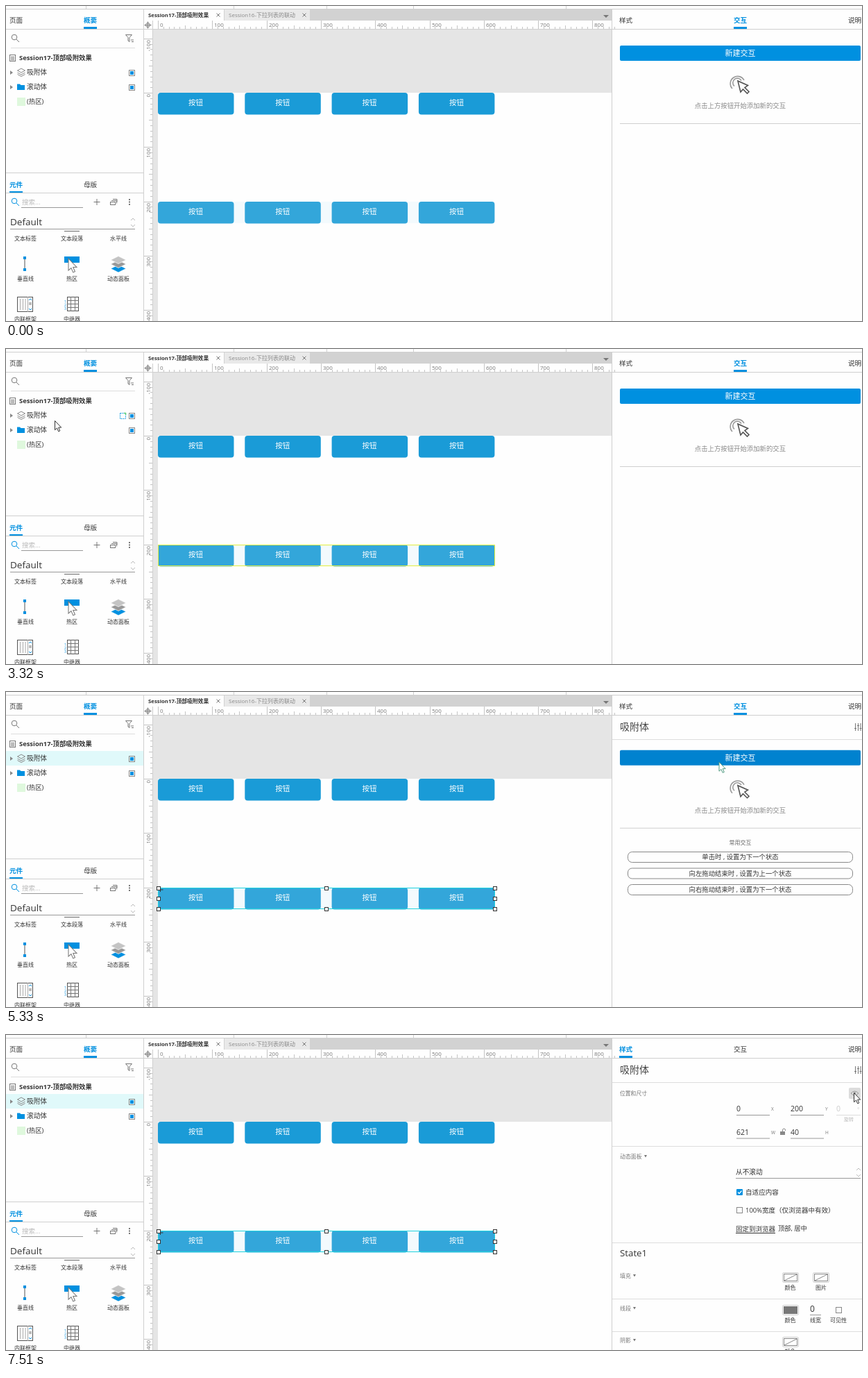
Write an HTML page that moves like this. It is 1234 px wide and 454 px high and loops after 8000 ms.

```html
<!DOCTYPE html>
<html>
<head>
<meta charset="utf-8">
<style>
  html, body { margin: 0; width: 100%; height: 100%; overflow: hidden; background: #fefefe; }
  svg { display: block; width: 1234px; height: 454px; }
  text { font-family: "Open Sans", "Noto Sans CJK SC", "Noto Sans CJK", sans-serif; white-space: pre; }
</style>
</head>
<body>
<svg id="stage" viewBox="0 0 1234 454"></svg>
<script>
const BLUE = '#0090e0', LINE = '#cfcfcf', INK = '#333', GREY = '#777';

// Markup helpers
const rect = (x, y, w, h, fill, more = '') =>
  `<rect x="${x}" y="${y}" width="${w}" height="${h}" fill="${fill}" ${more}/>`;
const box = (x, y, w, h, stroke, fill = 'none', r = 0) =>
  rect(x + .5, y + .5, w - 1, h - 1, fill, `stroke="${stroke}" rx="${r}"`);
const path = (d, stroke, fill = 'none', width = 1) =>
  `<path d="${d}" stroke="${stroke}" fill="${fill}" stroke-width="${width}"/>`;
const text = (x, y, s, size, fill = INK, more = '') =>
  `<text x="${x}" y="${y}" font-size="${size}" fill="${fill}" ${more}>${s}</text>`;
const center = (x, y, s, size, fill, more = '') =>
  text(x, y, s, size, fill, 'text-anchor="middle" ' + more);
const hline = (x1, x2, y, color = LINE) => rect(x1, y, x2 - x1, 1, color);
const group = (id, body, more = '') => `<g id="${id}" ${more}>${body}</g>`;
const bold = 'font-weight="700"';

const tab = (x, y, s, active) => active
  ? text(x, y, s, 9.6, BLUE, bold) + rect(x, y + 6, 19, 3, BLUE)
  : text(x, y, s, 9.6);
const search = (y, color) =>
  `<circle cx="12" cy="${y - 1}" r="3.8" fill="none" stroke="${color}"/>` +
  path(`M15 ${y + 2}l4 4`, color);
const spinner = (x, y) => path(`M${x - 3} ${y - 3}l3 -3l3 3M${x - 3} ${y + 3}l3 3l3 -3`, '#bbb');
const cross = x => path(`M${x - 2.5} 10.5l5 5m0 -5l-5 5`, GREY);
const arrow = 'V13.2L3 10.4L5.2 15.3L7.3 14.4L5.2 9.6H9.2Z';

function leftPanel() {
  const expander = y => path(`M6 ${y - 3}l4 3l-4 3z`, 'none', '#888');
  const visibility = y => box(177, y - 4, 9, 9, '#888') + rect(179, y - 2, 5, 5, BLUE);
  const layer = (y, fill) => path(`M162 ${y - 5.5}l11 5.5l-11 5.5l-11 -5.5z`, '#fefefe', fill, .7);
  const labels = (y, names) => names.map((s, i) => center(28 + i * 67, y, s, 8)).join('');
  const icons =
    // vertical line, hot spot, dynamic panel
    path('M27 363v18', '#555') + rect(25, 361, 4, 4, BLUE) + rect(25, 378, 4, 4, BLUE) +
    rect(84, 361, 22, 9, BLUE) +
    `<g transform="translate(90 364) scale(1.3)">${path('M0 0' + arrow, '#777', '#fff', .8)}</g>` +
    layer(378.5, BLUE) + layer(372, '#999') + layer(366, '#c4c4c4') +
    // inline frame, repeater
    box(16, 419, 23, 22, '#555') + path('M31.5 419v22M20.5 422v16M24.5 422v16M28 422v16', '#aaa') +
    path('M33 424l2 -2l2 2M33 436l2 2l2 -2', BLUE) + rect(33, 427, 4, 4, '#bbb') +
    box(88, 419, 17, 21, '#555') + path('M93.5 419v21M99.5 419v21M88 424.5h17M88 429.5h17M88 434.5h17', GREY) +
    [1, 2, 3].map(i => text(84, 423 + i * 5, i, 5, BLUE)).join('');
  return group('row', rect(0, 85, 198, 21, '#e0f9fa')) +
    tab(5, 24, '页面') + tab(112, 24, '概要', true) + hline(0, 198, 33) +
    search(46, GREY) + path('M172.5 41.5h9l-3.5 4v6l-2 -1.5v-4.500zM180 49h4M181 51.500h3', GREY) +
    hline(7, 186, 60, '#ddd') +
    box(5, 70, 9, 10, GREY) + path('M7 73.5h5M7 75.5h5M7 77.500h5', GREY) +
    text(19, 77.500, 'Session17-顶部吸附效果', 9.4, INK, bold) +
    expander(96) + expander(117) + visibility(96) + visibility(117) +
    path('M16.5 93l5.500 -3l5.500 3l-5.500 3zM16.5 96l5.500 3l5.500 -3M16.5 98.500l5.500 3l5.500 -3', '#888') +
    path('M16 112.500h4l1.500 1.500h5.500v7h-11z', 'none', BLUE) +
    rect(16, 132, 12, 12, '#dff8dd') +
    text(30, 98.500, '吸附体', 9.700) + text(30, 120, '滚动体', 9.700) + text(30, 141, '(热区)', 9.400) +
    group('target', rect(164.500, 92.500, 8, 8, 'none', 'stroke="#1a9fe0" stroke-dasharray="2 1"') +
      path('M170 92.500h3M172.500 92v3', '#5c7', 'none', 1.500)) +
    hline(0, 198, 240) + tab(5, 261, '元件', true) + tab(112, 261, '母版') + hline(0, 198, 269) +
    search(282, BLUE) + text(23, 286, '搜索...', 9.500, '#bbb') + hline(22, 111, 290, '#999') +
    path('M126.500 282.500h9M131 278v9', GREY) +
    box(150, 282, 8, 5, GREY) + path('M152 280.500h7.500v4M154 278.500h6v4', GREY) +
    [278, 281.500, 285].map(y => rect(177, y, 2, 2, GREY)).join('') +
    text(6, 315.500, 'Default', 13.500) + spinner(183, 312) + hline(6, 186, 321, '#999') +
    hline(84, 106, 324, '#666') + icons +
    labels(338, ['文本标签', '文本段落', '水平线']) +
    labels(396, ['垂直线', '热区', '动态面板']) +
    labels(454, ['内联框架', '中继器']) + rect(198, 4, 1, 450, LINE);
}

function rulers() {
  const unit = .783, ticks = [];
  for (let i = -10; i <= 84; i++) {
    const x = Math.round(219 + i * 10 * unit), y = Math.round(125 + i * 10 * unit);
    const major = i % 10 === 0, len = major ? 12 : i % 5 ? 3 : 5;
    if (x >= 212) ticks.push(rect(x, 33 - len, 1, len, '#c4c4c4'));
    if (y > 34) ticks.push(rect(211 - len, y, len, 1, '#c4c4c4'));
    if (!major) continue;
    if (i >= 0) ticks.push(text(x + 3, 30, i * 10, 8, GREY));
    if (y > 34 && y < 454)
      ticks.push(text(0, 0, i * 10, 8, GREY, `text-anchor="end" transform="translate(208 ${y + 2}) rotate(-90)"`));
  }
  return rect(199, 21, 674, 13, '#fefefe') + rect(199, 34, 12, 420, '#fefefe') + ticks.join('') +
    hline(199, 873, 33) + rect(211, 21, 1, 433, LINE) +
    '<circle cx="204.5" cy="27.5" r="3" fill="none" stroke="#777"/>' + path('M199.500 27.500h10M204.500 22.500v10', GREY);
}

function editor() {
  const buttons = (y, fill) => [0, 1, 2, 3].map(i =>
    rect(219 + i * 125.3, y, 109.500, 31.500, fill, 'rx="4"') +
    center(273.500 + i * 125.3, y + 18.300, '按钮', 10.500, '#fff')).join('');
  const handles = [[219, 282], [461, 282], [704, 282], [219, 297], [704, 297], [219, 312], [461, 312], [704, 312]]
    .map(([x, y]) => box(x - 2, y - 2, 6, 6, '#333', '#fff')).join('');
  return rect(199, 5, 674, 16, '#d2d2d2') + rect(199, 5, 115, 16, '#fefefe') + rect(315, 5, 123, 16, '#e9e9e9') +
    text(205, 15.500, 'Session17-顶部吸附效果', 7.800, INK, bold) + cross(306) +
    text(321, 15.500, 'Session16-下拉列表的联动', 8, '#888') + cross(430) +
    path('M861 13h8l-4 4z', 'none', GREY) +
    rect(211, 34, 662, 420, '#e5e5e5') + rect(219, 125, 654, 329, '#fefefe') + rulers() +
    buttons(125, '#1a9bd7') + rect(219, 282, 485, 31, '#f3fafd') + buttons(282, '#33a6da') +
    group('hoverTop', box(219, 125, 486, 32, '#e2ee3c')) +
    group('hoverPanel', box(219, 282, 486, 31, '#e2ee3c')) +
    group('selection', box(219, 282, 486, 31, '#1fd3de') + path('M222.500 288v-3h4', INK) + handles) +
    group('thumb', rect(866, 283, 5, 22, '#d4d4d4', 'rx="1"'));
}

function interactions() {
  return group('interact', rect(885, 57, 347, 22, BLUE, 'rx="2" id="create"') +
    center(1058.500, 72, '新建交互', 11, '#fff') +
    path('M1047 119a10.500 10.500 0 1 1 17 -12M1050 115.500a6.500 6.500 0 1 1 10 -8', '#999', 'none', 1.600) +
    path('M1055 108l4 16l3.500 -4l6 6l2.500 -2.500l-6 -6l4.500 -3z', '#555', '#fff', 1.600) +
    center(1058.500, 147, '点击上方按钮开始添加新的交互', 9.400, '#888') + hline(885, 1232, 169));
}

function suggestions() {
  const names = ['单击时 , 设置为下一个状态', '向左拖动结束时 , 设置为上一个状态', '向右拖动结束时 , 设置为下一个状态'];
  return group('suggest', center(1058.500, 220, '常用交互', 8, '#666') + names.map((s, i) =>
    box(896, 230 + i * 23.500, 325, 16, '#888', 'none', 6) +
    center(1058.500, 241.300 + i * 23.500, s, 9.400, INK)).join(''));
}

function styles() {
  const field = (x, y, value, name) =>
    text(x, y, value, 10.500) + hline(x, x + 48, y + 5, '#999') + text(x + 50, y - 1, name, 6.500, GREY);
  const section = (y, s) => text(885, y, s, 7.900, GREY) +
    path(`M${888 + s.length * 8} ${y - 5}h4l-2 3.500z`, 'none', GREY);
  const swatch = (x, y) => box(x, y, 24, 15, '#ccc', '#fff', 2) +
    box(x + 2, y + 2, 20, 11, '#888') + path(`M${x + 3} ${y + 12}l18 -9`, '#888');
  const label = (x, y, s) => center(x, y, s, 8, INK);
  return group('style', text(885, 87, '位置和尺寸', 7.800, GREY) +
    group('eyeHover', rect(1215, 76, 17, 16, '#dcdcdc', 'rx="2"')) +
    path('M1218 84q5.500 -6 11 0q-5.500 6 -11 0z', '#999') + '<circle cx="1223.5" cy="84" r="1.7" fill="#999"/>' +
    field(1053, 110, 0, 'X') + field(1131, 110, 200, 'Y') +
    text(1197, 110, 0, 10.500, '#ccc') + hline(1197, 1232, 115, '#ddd') + text(1227, 110, '°', 8, '#ccc') +
    center(1215, 123.500, '旋转', 7, '#bbb') +
    field(1053, 143.500, 621, 'W') + field(1131, 143.500, 40, 'H') +
    rect(1116, 139, 7, 5, '#888') + path('M1119.500 139v-2a2 2 0 0 1 4 0v1', '#888') +
    hline(874, 1234, 160, '#ddd') + section(178, '动态面板') +
    text(1052, 201, '从不滚动', 9.700) + spinner(1229, 198) + hline(1052, 1232, 206, '#999') +
    rect(1053, 222, 9, 9, BLUE, 'rx="1"') + path('M1055 226.500l2 2l3.500 -4', '#fff', 'none', 1.300) +
    text(1066, 230.300, '自适应内容', 9.600) +
    box(1053, 248, 9, 9, '#888') + text(1066, 256.300, '100%宽度（仅浏览器中有效）', 9.500) +
    text(1052, 282.500, '固定到浏览器', 9.500) + hline(1052, 1109, 285, INK) + text(1113, 282, '顶部, 居中', 9.300) +
    hline(874, 1234, 299, '#ddd') + text(885, 318.500, 'State1', 13.300) +
    section(350, '填充') + swatch(1119, 342) + swatch(1163, 342) + label(1130.500, 367, '颜色') + label(1175, 367, '图片') +
    hline(874, 1234, 380, '#ddd') + section(397, '线段') +
    box(1119, 389, 24, 15, '#ccc', '#fff', 2) + rect(1121, 391, 20, 11, GREY) +
    text(1159, 399, 0, 12) + hline(1159, 1175, 403, '#999') + box(1196, 392, 9, 9, '#888') +
    label(1130.500, 414, '颜色') + label(1167, 414, '线宽') + label(1200, 414, '可见性') +
    hline(874, 1234, 427, '#ddd') + section(443, '阴影') + swatch(1119, 435) + label(1130.500, 459, '颜色'));
}

function rightPanel() {
  const title = text(885, 55, '吸附体', 14, '#444') + hline(874, 1234, 68, '#ddd') +
    path('M1224.500 45v11M1228.500 45v11M1232 45v11M1223 52.500h3M1227 48.500h3M1230.500 52.500h3', GREY);
  return rect(873, 4, 1, 450, LINE) + hline(873, 1234, 33) + tab(1214, 24, '说明') +
    group('tabsInteract', tab(884, 24, '样式') + tab(1049, 24, '交互', true)) +
    group('tabsStyle', tab(884, 24, '样式', true) + tab(1049, 24, '交互')) +
    group('title', title) + interactions() + suggestions() + styles();
}

const toolbar = hline(0, 1234, 4) + [115, 328, 462, 587, 807].map(x => rect(x, 0, 1, 4, LINE)).join('');
stage.innerHTML = leftPanel() + editor() + rightPanel() + toolbar +
  group('pointer', path('M0 0' + arrow, '#333', '#fff', 1).replace('<path', '<path id="pointerShape"'));

// Pointer path: [tick, x, y], sampled once per tick
const TICK = 77.5, START = 690, LOOP = 8000;
const keys = [
  [0, 1080, 440], [4, 640, 275], [7, 455, 200], [10, 400, 171], [14, 353, 158], [21, 353, 158],
  [22, 352, 154], [23, 350, 151], [26, 350, 151], [30, 170, 125], [34, 70.500, 103.500], [37, 55, 97],
  [39, 48.500, 95.500], [49, 48.500, 95.500], [52, 240, 97], [56, 800, 99], [60, 1028, 101],
  [64, 1000, 62], [68, 945.500, 27.500], [71, 874, 23], [77, 874, 22], [80, 1090, 70],
  [82, 1223.500, 97], [83, 1223.500, 97], [85, 1180, 92], [88, 1222.500, 83.500], [99, 1222.500, 83.500]
];
const SELECT = 43, SHOW_PANEL = 44, SHOW_STYLE = 73;

function pointerAt(tick) {
  const i = Math.max(1, keys.findIndex(k => k[0] >= tick));
  const [t0, x0, y0] = keys[i - 1], [t1, x1, y1] = keys[i];
  const p = (tick - t0) / (t1 - t0);
  return [x0 + (x1 - x0) * p, y0 + (y1 - y0) * p];
}

const $ = id => document.getElementById(id);
const show = (id, on) => $(id).style.display = on ? '' : 'none';

function render(time) {
  const started = time >= START;
  const tick = started ? Math.floor((time - START + 25) / TICK) : 0;
  const [x, y] = pointerAt(tick);
  const over = (x1, y1, x2, y2) => started && x >= x1 && x < x2 && y >= y1 && y < y2;
  const selected = tick >= SELECT, panel = tick >= SHOW_PANEL, styled = tick >= SHOW_STYLE;
  const overRow = over(0, 85, 198, 106);
  const overCreate = panel && !styled && over(885, 84, 1232, 106);

  show('pointer', started);
  $('pointer').setAttribute('transform', `translate(${x} ${y})`);
  $('pointerShape').setAttribute('stroke', overCreate ? '#4f9a80' : '#333');
  show('row', selected);
  show('selection', selected);
  show('target', overRow);
  show('hoverPanel', overRow && !selected);
  show('hoverTop', over(219, 125, 705, 157));
  show('thumb', over(211, 34, 873, 454));
  show('title', panel);
  show('suggest', panel && !styled);
  show('interact', !styled);
  $('interact').setAttribute('transform', `translate(0 ${panel ? 26.700 : 0})`);
  $('create').setAttribute('fill', overCreate ? '#0082cf' : BLUE);
  show('tabsInteract', !styled);
  show('tabsStyle', styled);
  show('style', styled);
  show('eyeHover', over(1214, 75, 1233, 93));
}

function loop() {
  render(performance.now() % LOOP);
  requestAnimationFrame(loop);
}
loop();
</script>
</body>
</html>
```
